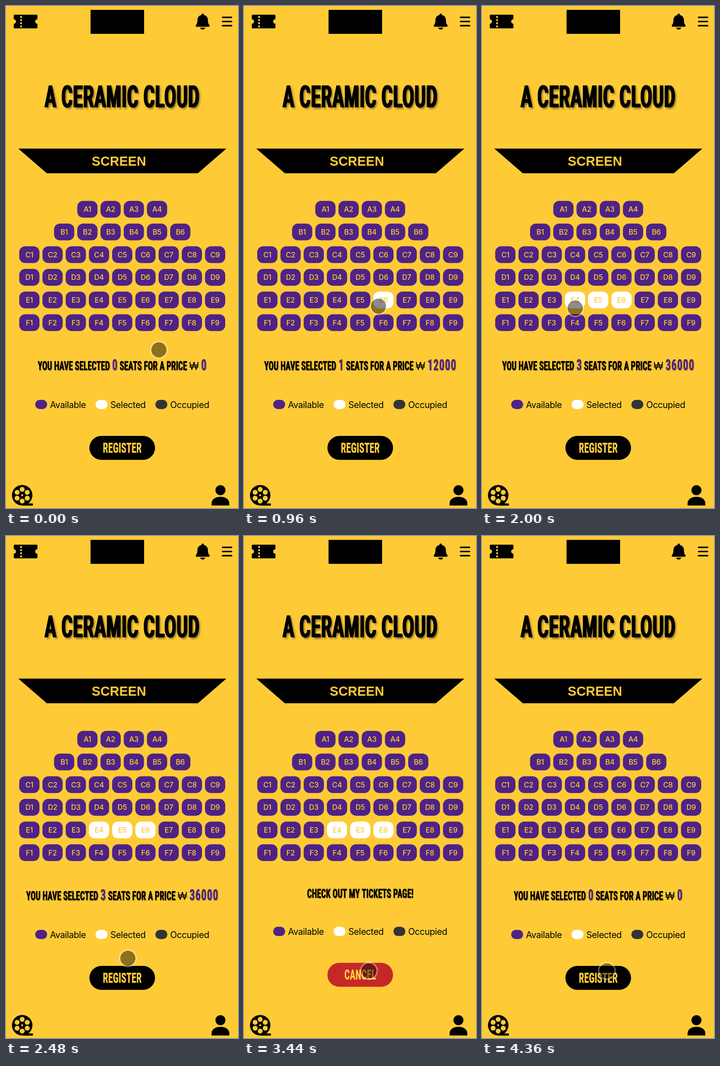
Animation of 509x1100 px, one loop 4.4 s. Source, as an HTML page with a canvas:

```html
<!DOCTYPE html>
<html lang="en">
<head>
<meta charset="utf-8">
<title>Seat booking</title>
<style>
  html, body { margin: 0; width: 100%; height: 100%; overflow: hidden; background: #fecb36; }
  canvas { display: block; }
</style>
</head>
<body>
<canvas id="stage" width="509" height="1100"></canvas>
<script>
const ctx = document.getElementById('stage').getContext('2d');
const LOOP = 4400;
const YELLOW = '#fecb36', PURPLE = '#4f2386', BLACK = '#000', RED = '#c62828';
const SANS = 'Inter, Roboto, sans-serif';

// Poster lettering: width ratio, and tracking in em.
const CONDENSE = 0.55, TRACK = 0.038, TRACK_DIGITS = 0.11;

const ROWS = [['A', 4], ['B', 6], ['C', 9], ['D', 9], ['E', 9], ['F', 9]];
const PICKS = { E6: 840, E5: 1220, E4: 1840 };
const REGISTER_AT = 2720, CANCEL_AT = 3760, PRICE = 12000;

// Each move: start time, end time, destination.
const START = [335.5, 753.5];
const MOVES = [
  [100, 800, 298, 658],
  [900, 1240, 263, 655],
  [1420, 1780, 204.5, 662],
  [2060, 2580, 274, 953]
];

const clamp = v => Math.min(1, Math.max(0, v));
const smooth = u => u * u * (3 - 2 * u);
const mix = (a, b, u) => a + (b - a) * u;

function box(x, y, w, h, r, color) {
  ctx.fillStyle = color;
  ctx.beginPath();
  ctx.roundRect(x, y, w, h, r);
  ctx.fill();
}

function disc(x, y, r, color) {
  ctx.fillStyle = color;
  ctx.beginPath();
  ctx.arc(x, y, r, 0, Math.PI * 2);
  ctx.fill();
}

function shape(d, color = BLACK) {
  ctx.fillStyle = color;
  ctx.fill(new Path2D(d));
}

function label(str, x, y, font, color, align = 'center', spacing = 0) {
  ctx.font = font;
  ctx.letterSpacing = spacing + 'px';
  ctx.textAlign = align;
  ctx.fillStyle = color;
  ctx.fillText(str, x, y);
  ctx.letterSpacing = '0px';
}

function setDisplay(size, track) {
  ctx.font = `700 ${size}px Roboto, "Liberation Sans", sans-serif`;
  ctx.letterSpacing = size * track + 'px';
}

function displayWidth(str, size, track = TRACK) {
  setDisplay(size, track);
  const w = ctx.measureText(str).width * CONDENSE;
  ctx.letterSpacing = '0px';
  return w;
}

// Repeats the text a little to each side to thicken the stems.
function display(str, x, y, size, color, { shadow, bold = 0.009, track = TRACK } = {}) {
  ctx.save();
  setDisplay(size, track);
  ctx.textAlign = 'left';
  ctx.fillStyle = color;
  ctx.translate(x + size * track * CONDENSE / 2, y);
  ctx.scale(CONDENSE, 1);
  if (shadow) {
    [ctx.shadowOffsetX, ctx.shadowBlur] = shadow;
    ctx.shadowOffsetY = ctx.shadowOffsetX;
    ctx.shadowColor = 'rgba(0,0,0,.5)';
  }
  const spread = size * bold / CONDENSE;
  for (const dx of [0, -spread, spread]) {
    ctx.fillText(str, dx, 0);
    ctx.shadowColor = 'transparent';
  }
  ctx.restore();
}

function displayCentered(str, x, y, size, color, style) {
  display(str, x - displayWidth(str, size) / 2, y, size, color, style);
}

function header() {
  shape('M19 19H67Q69 19 69 21V29A5 5 0 0 0 69 39V47Q69 49 67 49H19' +
        'Q17 49 17 47V39A5 5 0 0 0 17 29V21Q17 19 19 19Z');
  for (let i = 0; i < 4; i++) box(31.2, 21.8 + i * 6.9, 3.8, 4.4, 1.5, YELLOW);

  ctx.fillStyle = BLACK;
  ctx.fillRect(185.5, 8.5, 117.5, 52.5);

  shape('M431.5 16.5Q434 16.5 434 19.5C440 21 443 25.5 443 31C443 38 445 40 446.5 42' +
        'Q447.5 45.5 444 45.5H419Q415.5 45.5 416.5 42C418 40 420 38 420 31' +
        'C420 25.5 423 21 429 19.5Q429 16.5 431.5 16.5Z');
  shape('M426 47.5H437Q436 51.5 431.5 51.5T426 47.5Z');

  for (let i = 0; i < 3; i++) box(473.5, 23.2 + i * 9.2, 23, 3.2, 1.6, BLACK);
}

function footer() {
  disc(35.5, 1072, 22.5, BLACK);
  for (let i = 0; i < 6; i++) {
    const a = Math.PI * (i / 3 - 0.5);
    disc(35.5 + 12.8 * Math.cos(a), 1072 + 12.8 * Math.sin(a), 5.4, YELLOW);
  }
  disc(35.5, 1072, 2.2, YELLOW);
  box(36, 1090, 23, 4.7, 1, BLACK);

  disc(470.5, 1061, 11, BLACK);
  shape('M451 1094.5V1090C451 1081 459 1075.5 470.5 1075.5S490 1081 490 1090V1094.5Z');
}

function seats(t) {
  ROWS.forEach(([row, count], r) => {
    const y = 445.4 + r * 49.7;
    for (let i = 0; i < count; i++) {
      const x = 255 + (i - (count - 1) / 2) * 50.95;
      const id = row + (i + 1);
      const u = id in PICKS && t < CANCEL_AT ? clamp((t - PICKS[id]) / 100) : 0;
      const color = `rgb(${mix(79, 255, u)},${mix(35, 255, u)},${mix(134, 255, u)})`;
      box(x - 22.2, y - 18.4, 44.4, 36.8, 13, color);
      label(id, x, y + 5.9, '500 15.8px ' + SANS, YELLOW, 'center', -0.3);
    }
  });
}

function summary(count) {
  const small = 27.6, large = 34, shadow = [1, 2];
  const wonFont = '400 22.5px ' + SANS;
  const words = { shadow }, digits = { shadow, track: TRACK_DIGITS };
  const parts = [
    ['YOU HAVE SELECTED ', small, BLACK, words],
    [String(count), large, PURPLE, digits],
    [' SEATS FOR A PRICE ', small, BLACK, words],
    ['₩'],
    [' ', small, BLACK, words],
    [String(count * PRICE), large, PURPLE, digits]
  ];
  ctx.font = wonFont;
  const wonWidth = ctx.measureText('₩').width;
  const widths = parts.map(([s, size, , style]) =>
    size ? displayWidth(s, size, style.track) : wonWidth);
  let x = 255 - widths.reduce((a, b) => a + b) / 2;
  parts.forEach(([s, size, color, style], i) => {
    if (size) display(s, x, 798, size, color, style);
    else label(s, x, 797, wonFont, BLACK, 'left');
    x += widths[i];
  });
}

function legend(dy) {
  const items = [
    [64, PURPLE, 'Available'],
    [196.5, '#fff', 'Selected'],
    [327.7, '#333437', 'Occupied']
  ];
  for (const [x, color, name] of items) {
    box(x, 863 + dy, 26.3, 20.3, 10, color);
    label(name, x + 32.5, 880.5 + dy, '400 19.5px ' + SANS, BLACK, 'left', -0.4);
  }
}

function button(text, color, dy) {
  box(183, 942 + dy, 144, 52.5, 26.2, color);
  displayCentered(text, 255, 979 + dy, 31.5, YELLOW);
}

function cursor(t) {
  let [x, y] = START;
  for (const [from, to, nx, ny] of MOVES) {
    const u = smooth(clamp((t - from) / (to - from)));
    x = mix(x, nx, u);
    y = mix(y, ny, u);
  }
  disc(x, y, 16.7, 'rgba(0,0,0,.45)');
  ctx.strokeStyle = 'rgba(255,255,255,.37)';
  ctx.lineWidth = 3;
  ctx.beginPath();
  ctx.arc(x, y, 18.2, 0, Math.PI * 2);
  ctx.stroke();
}

function draw(t) {
  ctx.fillStyle = YELLOW;
  ctx.fillRect(0, 0, 509, 1100);
  header();
  displayCentered('A CERAMIC CLOUD', 254.5, 222, 66.8, BLACK, { shadow: [3, 4], bold: 0.018 });
  shape('M27 312.5H483.5L421 366.5H89.5Z');
  label('SCREEN', 247.7, 350, '700 28.6px "Liberation Sans", Arial, sans-serif', YELLOW);
  seats(t);

  const booked = t >= REGISTER_AT && t < CANCEL_AT;
  const dy = booked ? -6.7 : 0;
  if (booked) {
    displayCentered('CHECK OUT MY TICKETS PAGE!', 255, 793, 27.6, BLACK, { shadow: [1, 2] });
  } else {
    const picked = Object.values(PICKS).filter(at => t >= at && t < CANCEL_AT);
    summary(picked.length);
  }
  legend(dy);
  button(booked ? 'CANCEL' : 'REGISTER', booked ? RED : BLACK, dy);
  footer();
  cursor(t);
}

const began = performance.now();
function tick() {
  draw((performance.now() - began) % LOOP);
  requestAnimationFrame(tick);
}
tick();
</script>
</body>
</html>
```
